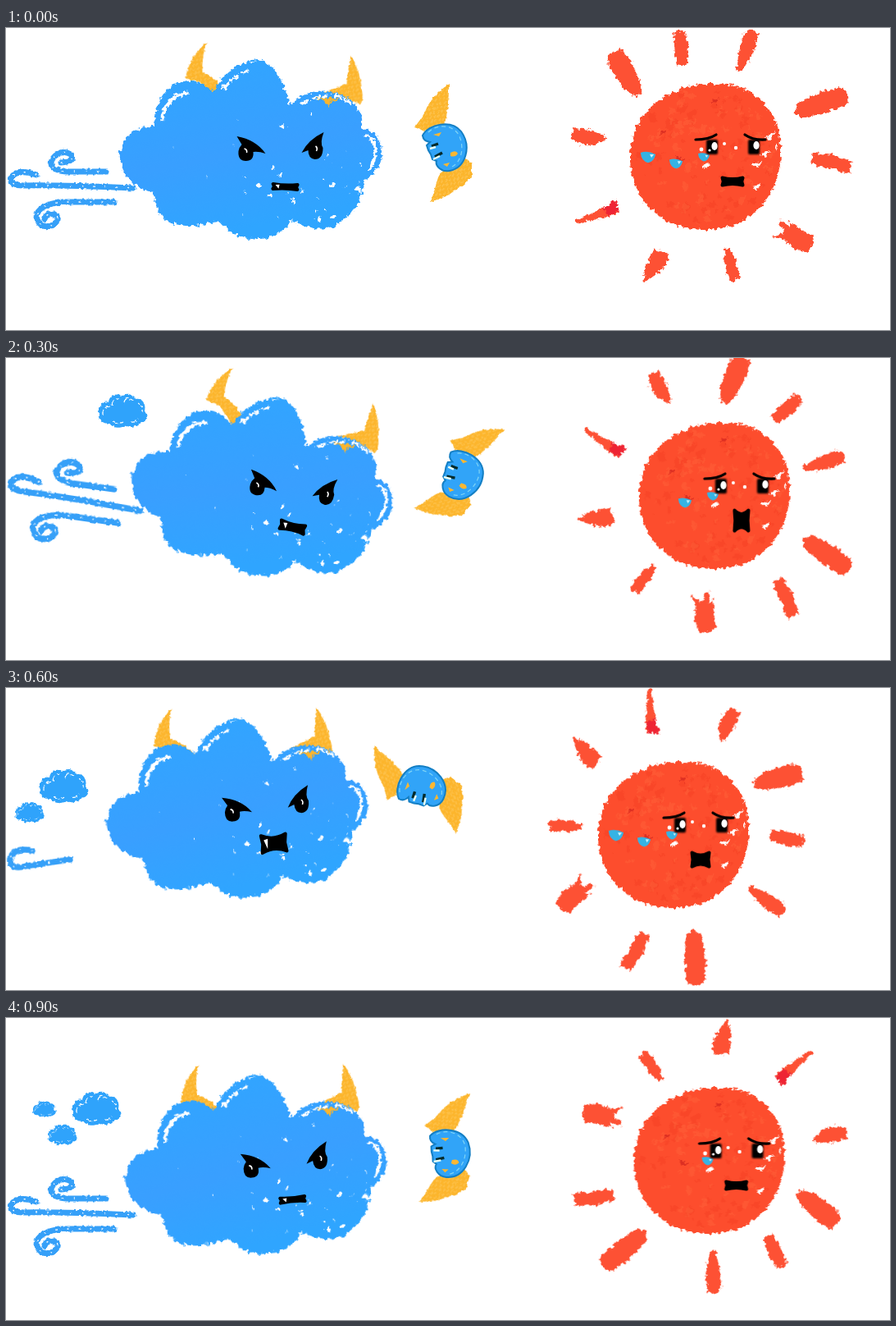
Recreate the animation shown at these times as an HTML page. Size 1078 by 368 pixels, loop 1 s.

```html
<!DOCTYPE html>
<html lang="en">
<head>
<meta charset="utf-8">
<title>Cloud chases sun</title>
<style>
  html, body { margin: 0; width: 100%; height: 100%; overflow: hidden; background: #fff; }
  svg { display: block; width: 1078px; height: 368px; }
</style>
</head>
<body>
<svg viewBox="0 0 1078 368" xmlns="http://www.w3.org/2000/svg">
  <defs>
    <filter id="rough" x="-10%" y="-15%" width="120%" height="130%" color-interpolation-filters="sRGB">
      <feTurbulence type="fractalNoise" baseFrequency=".22" numOctaves="2" seed="4"/>
      <feDisplacementMap in="SourceGraphic" scale="8" xChannelSelector="R" yChannelSelector="G"/>
    </filter>
    <filter id="soft" x="-10%" y="-20%" width="120%" height="140%" color-interpolation-filters="sRGB">
      <feTurbulence type="fractalNoise" baseFrequency=".3" numOctaves="1" seed="9"/>
      <feDisplacementMap in="SourceGraphic" scale="4" xChannelSelector="R" yChannelSelector="G"/>
    </filter>
    <filter id="blur" x="-30%" y="-30%" width="160%" height="160%"><feGaussianBlur stdDeviation=".9"/></filter>
    <linearGradient id="sky" x1="0" y1="0" x2=".3" y2="1">
      <stop offset="0" stop-color="#2fa6ff"/><stop offset=".6" stop-color="#399fff"/><stop offset="1" stop-color="#2fa5ff"/>
    </linearGradient>
    <pattern id="gold" width="7" height="7" patternUnits="userSpaceOnUse" patternTransform="rotate(35)">
      <rect width="7" height="7" fill="#fcb52c"/><path d="M1 0V4M5 3V7" stroke="#ffd071" stroke-width=".8"/>
    </pattern>
    <path id="body" d="M183 120C150 118 135 145 142 165C146 185 165 198 181 200C184 230 200 240 222 241C240 242 255 236 262 236C275 250 290 260 308 256C330 256 345 245 350 234C365 245 395 250 410 236C430 222 438 205 437 186C455 178 462 160 459 145C456 128 445 122 434 124C437 110 432 96 420 87C400 73 370 74 347 93C340 60 325 40 308 39C285 40 262 60 254 78C240 62 215 62 205 70C190 80 182 100 183 120Z"/>
    <clipPath id="inBody"><use href="#body"/></clipPath>
    <g id="puff">
      <path fill="#2fa3fb" d="M-29 6C-33-6-22-14-18-9C-18-20-6-22-3-17C2-23 14-20 15-14C24-16 28-6 26 0C33 6 28 15 22 14C16 20 8 22 4 18C-4 23-14 21-17 15C-24 17-30 12-29 6Z"/>
      <path fill="none" stroke="#fff" stroke-width="1.2" stroke-dasharray="7 3" d="M-25 6Q-26-5-16-5M-14-6Q-13-15-5-14M1-10Q3-18 12-12M18-9Q24-6 23 2M-12 13Q-6 18 0 14M9 14Q15 15 18 10"/>
    </g>
    <g id="tear"><path fill="#35b3e4" d="M-9-5Q-1-8 9-3Q7 6 0 7Q-8 5-9-5Z"/><path fill="#c9f1fb" d="M2-3L7-3L4 1Z"/></g>
  </defs>

  <g id="wind" filter="url(#soft)" fill="none" stroke="#36a0f8" stroke-width="7" stroke-linecap="round" stroke-linejoin="round">
    <path id="mid" d="M34-6Q12-14 3-3Q0 6 18 7Q60 6 152 10"/>
    <path id="upper" d="M64-21Q82-22 76-31Q64-38 54-26Q46-12 70-10L119-10"/>
    <path id="lower" d="M129 27L66 27Q36 30 34 45Q38 60 52 56Q66 48 56 42Q46 40 44 48"/>
    <path id="stub" d="M29-12Q8-18 2-4Q0 10 20 6L73 1"/>
  </g>
  <g id="puffs" filter="url(#soft)">
    <use href="#puff"/>
    <use href="#puff" transform="translate(-42 32) scale(.6)"/>
    <use href="#puff" transform="translate(-64 1) scale(.47)"/>
  </g>

  <g id="horns"><g filter="url(#soft)" fill="url(#gold)">
    <path d="M245 10Q222 28 217 53L232 57Q246 68 251 82L266 72Q252 52 238 46Q238 28 245 10Z"/>
    <path d="M420 35Q414 58 413 70Q400 74 380 80Q405 82 428 96Q433 90 431 78Q430 55 420 35Z"/>
  </g></g>
  <g id="cloud">
    <g filter="url(#rough)">
      <use href="#body" fill="url(#sky)"/>
      <g clip-path="url(#inBody)" id="specks"></g>
      <g fill="none" stroke="#fff" stroke-linecap="round">
        <path stroke-width="4.5" d="M192 112Q195 84 222 79"/>
        <path stroke-width="3" stroke-dasharray="9 5" d="M266 74Q280 58 298 51M362 92Q376 84 392 83M402 82Q416 86 422 92"/>
        <path stroke-width="3.5" d="M440 131Q453 136 452 152Q450 166 444 174"/>
      </g>
      <path fill="#fcb52c" d="M380 85L408 86L398 90L395 97L390 90Z"/>
    </g>
    <g id="face">
      <path d="M283 132Q306 136 318 153Q309 150 303 151Q304 162 294 162Q284 162 285 150Q286 145 289 142Z"/>
      <path d="M389 127Q384 140 388 146Q388 160 378 160Q370 159 370 149L362 152Q370 136 389 127Z"/>
      <path fill="none" stroke="#fff" stroke-width="1.6" d="M292 147Q296 148 295 152M379 144Q382 146 380 150"/>
    </g>
    <g id="mouth"><path id="lips" stroke="#000" stroke-width="4" stroke-linejoin="round"/><path id="tooth" fill="#fff"/></g>
  </g>

  <g id="rang">
    <g filter="url(#soft)" fill="url(#gold)">
      <path d="M11-72Q-12-55-18-38Q-22-30-31-19L-16-14L6-24Q11-40 11-72Z"/>
      <path d="M-11 72L8 65L28 52L39 42L39 26L30 18L6 28L-2 42Z"/>
    </g>
    <path fill="#31a4f8" stroke="#147fc4" stroke-width="2" d="M-21-9C-14-23 14-29 26-14C39 4 32 30 12 34C2 36-6 28-4 22L-9 20L-11 14L-14 9L-16 3L-12-1Q-20-2-21-9Z"/>
    <path fill="none" stroke="#7fd4f5" stroke-width="1.2" stroke-dasharray="5 4" d="M-14-13C-4-23 15-23 23-10C31 6 26 25 13 30"/>
    <path fill="#fbb733" d="M-8-10L2-13L-1-8ZM13 12Q20 8 22 13Q19 18 13 16ZM4 26L12 24L9 29Z"/>
    <path fill="none" stroke="#062b2b" stroke-width="3.4" d="M-10 4L-2 1M-6 17L3 12"/>
    <path fill="none" stroke="#e8fff4" stroke-width="2.4" d="M-12 7L-5 5M-8 20L0 16"/>
  </g>

  <g id="sun">
    <g id="rays"><g filter="url(#rough)" fill="#fd5134">
      <path transform="rotate(-104) translate(136) rotate(9)" d="M-21-7L-8-8L20-7L21 6L2 9L-20 6Z"/>
      <path transform="rotate(-70) translate(136)" d="M-27-2L-5-8L20-10L27-3L24 8L0 8L-24 4Z"/>
      <path transform="rotate(-25) translate(153) rotate(7)" d="M-35 4L-30-8L-5-13L26-12L34-4L30 11L0 13L-28 10Z"/>
      <path transform="rotate(3) translate(151) rotate(9)" d="M-25-7L0-9L24-7L25 9L4 8L-24 7Z"/>
      <path transform="rotate(43) translate(145) rotate(-18)" d="M-26-12L-10-8L-14-15L0-12L22-10L24 9L6 13L-10 9L-26 11L-14 2Z"/>
      <path transform="rotate(78) translate(136)" d="M-21-3L-4-7L16-7L21 1L14 7L-4 7L-21 4Z"/>
      <path transform="rotate(116) translate(150)" d="M-21-10L-8-12L8-6L23 3L10 8L-10 10L-20 8Z"/>
      <path transform="rotate(152) translate(152) rotate(14)" d="M-26-4L-10-5L28-5L28 0L-8 6L-26 12Z"/>
      <path transform="rotate(152) translate(152) rotate(14)" fill="#ee2434" d="M-26-3L-12-4L-8 6L-26 12Z"/>
      <path transform="rotate(189) translate(147)" d="M-22 1L-8-9L12-10L22-3L20 8L0 9L-14 6Z"/>
      <path transform="rotate(225) translate(142) rotate(14)" d="M-31-4L-16-11L18-13L30-9L29 10L10 13L-20 10L-30 5Z"/>
    </g></g>
    <g filter="url(#rough)">
      <path fill="#fd4d2d" d="M-92 0C-92-50-50-89 10-89C60-91 92-55 92-10C94 40 60 89 0 89C-55 89-92 50-92 0Z"/>
      <g id="flecks"></g>
      <path fill="#fff" d="M72-24L84-30L79-21ZM67-3L78-8L74 1ZM55 8L70 6L62 13ZM57 36L66 34L62 42ZM-5 10L6 8L0 14ZM84-14L88-16L87-6Z"/>
      <path fill="#dd2f22" d="M5-67L17-72L13-64ZM-36-1L-26 4L-33 7ZM-54-33L-47-29L-55-27Z"/>
    </g>
    <g id="tears"><use href="#tear"/><use href="#tear"/><use href="#tear"/></g>
    <g filter="url(#blur)"><rect x="1" y="-21" width="14" height="18" rx="2"/><rect x="52" y="-21" width="14" height="18" rx="2"/></g>
    <g fill="#fff"><ellipse cx="11" cy="-13" rx="3.6" ry="5"/><ellipse cx="62" cy="-14" rx="3.6" ry="5"/>
      <circle cx="23" cy="-16" r="2"/><circle cx="37" cy="-11" r="2.2"/><circle cx="-5" cy="-9" r="2.4"/><circle cx="5" cy="-8" r="1.6"/></g>
    <path fill="none" stroke="#000" stroke-width="3.2" stroke-linecap="round" d="M-12-21Q4-21 13-27M48-27Q58-20 73-21"/>
    <path id="gasp" transform="translate(33 30)" stroke="#000" stroke-width="4" stroke-linejoin="round"/>
  </g>
</svg>

<script>
const $ = id => document.getElementById(id);
const STEP = 100, COUNT = 10;

// Straight lines through a few [step, value] points.
function along(t, ...points) {
  const i = points.findIndex(p => p[0] >= t);
  if (i < 0) return points.at(-1)[1];
  if (i === 0) return points[0][1];
  const [a, from] = points[i - 1], [b, to] = points[i];
  return from + (to - from) * (t - a) / (b - a);
}

// Two lunges forward per loop, each followed by a drift back.
function surge(t, peak, low, peak2, rest) {
  const u = t || COUNT;
  if (u < 7) {
    const p = (u - 1) / 5;
    return peak + (low - peak) * p ** 3 * (p * (6 * p - 15) + 10);
  }
  return peak2 + (rest - peak2) * Math.sin(Math.PI / 2 * (u - 7) / 3);
}
const sway = t => Math.sin(2 * Math.PI * t / COUNT);

function random(seed) {
  return () => (seed = (seed * 16807) % 2147483647) / 2147483647;
}
function blot(rnd, x, y, size) {
  let d = "";
  for (let i = 0; i < 6; i++) {
    const a = i * Math.PI / 3, r = size * (.4 + rnd());
    d += `${i ? "L" : "M"}${(x + r * Math.cos(a)).toFixed(1)} ${(y + r * Math.sin(a)).toFixed(1)}`;
  }
  return d + "Z";
}

function buildSpecks() {
  const rnd = random(77);
  let d = "";
  for (let i = 0; i < 48; i++) {
    const x = 200 + 235 * Math.sqrt(rnd()), y = 95 + 140 * Math.sqrt(rnd());
    d += blot(rnd, x, y, .6 + 3 * rnd() ** 3);
  }
  $("specks").innerHTML = `<path fill="#fff" d="${d}"/>`;
}

function buildFlecks() {
  const rnd = random(31);
  const layer = (n, size, fill) => {
    let d = "";
    for (let i = 0; i < n; i++) {
      const a = 2 * Math.PI * rnd(), r = 84 * Math.sqrt(rnd());
      d += blot(rnd, r * Math.cos(a), r * Math.sin(a), size * (.5 + rnd()));
    }
    return `<path fill="${fill}" opacity=".35" d="${d}"/>`;
  };
  $("flecks").innerHTML = layer(80, 4, "#ef3a20") + layer(80, 3.5, "#ff6c40");
}

function dotWind() {
  for (const line of [...$("wind").children]) {
    const dots = `<path stroke="#fff" stroke-width="1.3" stroke-dasharray="1 13" d="${line.getAttribute("d")}"/>`;
    line.outerHTML = `<g id="${line.id}">${line.outerHTML.replace(/ id="\w+"/, "")}${dots}</g>`;
  }
}

function bow(w, h) {
  const x = w / 2 - 2, y = h / 2 - 2;
  return `M${-x} ${-y}Q0 ${-y * .3} ${x} ${-y}L${x * .9} 0L${x} ${y}Q0 ${y * .3} ${-x} ${y}L${-x * .9} 0Z`;
}
const show = (el, on) => el.setAttribute("visibility", on ? "visible" : "hidden");
const move = (el, x, y, a = 0, s = 1, px = 0, py = 0) =>
  el.setAttribute("transform", `translate(${x} ${y}) rotate(${a}) scale(${s}) translate(${-px} ${-py})`);

function drawCloud(t) {
  const x = surge(t, 327, 281, 341, 298);
  const y = along(t, [0, 148], [2, 164], [4, 148], [6, 147], [9, 179]);
  const tilt = 7 * sway(t);
  move($("cloud"), x, y, tilt, 1, 299.5, 148);
  move($("face"), 338, 147, tilt * .4, 1, 338, 147);
  move($("horns"), x + 28 + 25 * sway(t + .4), y - 122, 9.5 * sway(t) - 3, 1, 332, 23.5);

  const h = along(t, [0, 10], [2, 11], [6, 25], [9, 10]);
  move($("mouth"), 342, 193.5, 2 + tilt * .7);
  $("lips").setAttribute("d", bow(34, h));
  $("tooth").setAttribute("d", `M-12 ${-h * .2}L-7 ${-h * .25}L-8 ${h * .25}Z`);
}

function drawWind(t) {
  const tilt = along(t, [1, 0], [4, 12], [6, -3], [7, -16], [9, 0]);
  const y = along(t, [0, 185], [1, 188], [4, 135], [6, 212], [7, 284], [9, 230]);
  move($("wind"), 3, y, tilt, 1 + Math.abs(tilt) / 100);
  show($("stub"), t === 6);
  show($("mid"), t !== 6);
  show($("upper"), t < 4 || t > 6);
  show($("lower"), t < 5 || t > 8);

  move($("puffs"), along(t, [1, 130], [3, 143], [6, 71], [7, 131], [9, 111]), along(t, [1, 80], [4, 56], [7, 151], [9, 110]));
  const [big, small, tiny] = $("puffs").children;
  show(big, t > 0);
  show(small, t % 5 === 1 || t % 5 === 4);
  show(tiny, t === 9);
}

function drawRang(t) {
  const y = along(t, [0, 140], [3, 135], [4, 138], [6, 124], [9, 158]);
  move($("rang"), surge(t, 578, 499, 572, 529), y, along(t, [0, 0], [3, 40], [6, -52], [9, 16]));
}

function drawSun(t) {
  move($("sun"), surge(t, 887, 814, 887, 853), along(t, [0, 157], [6.5, 181], [9, 174]));
  move($("rays"), 3, -1, 17.7 * t);

  const open = Math.sin(Math.PI / 4 * (Math.max(t, 1) - 1)) ** 2;
  $("gasp").setAttribute("d", bow(29 - 8 * open, 13 + 16 * open));

  const count = Math.floor(along(t, [0, 3], [2, 2], [4, 3], [6, 3], [7, 2], [9, 1]));
  [...$("tears").children].forEach((tear, i) => {
    show(tear, i < count);
    move(tear, -2 - 34 * i, i % 2 * (2 + 6 * Math.cos(2 * Math.PI * t / 3)), 0, .78 + .12 * i);
  });
}

buildSpecks();
buildFlecks();
dotWind();

const start = performance.now();
let last = -1;
function tick() {
  const step = Math.floor((performance.now() - start) / STEP) % COUNT;
  if (step !== last) {
    last = step;
    for (const draw of [drawCloud, drawWind, drawRang, drawSun]) draw(step);
  }
  requestAnimationFrame(tick);
}
tick();
</script>
</body>
</html>
```
